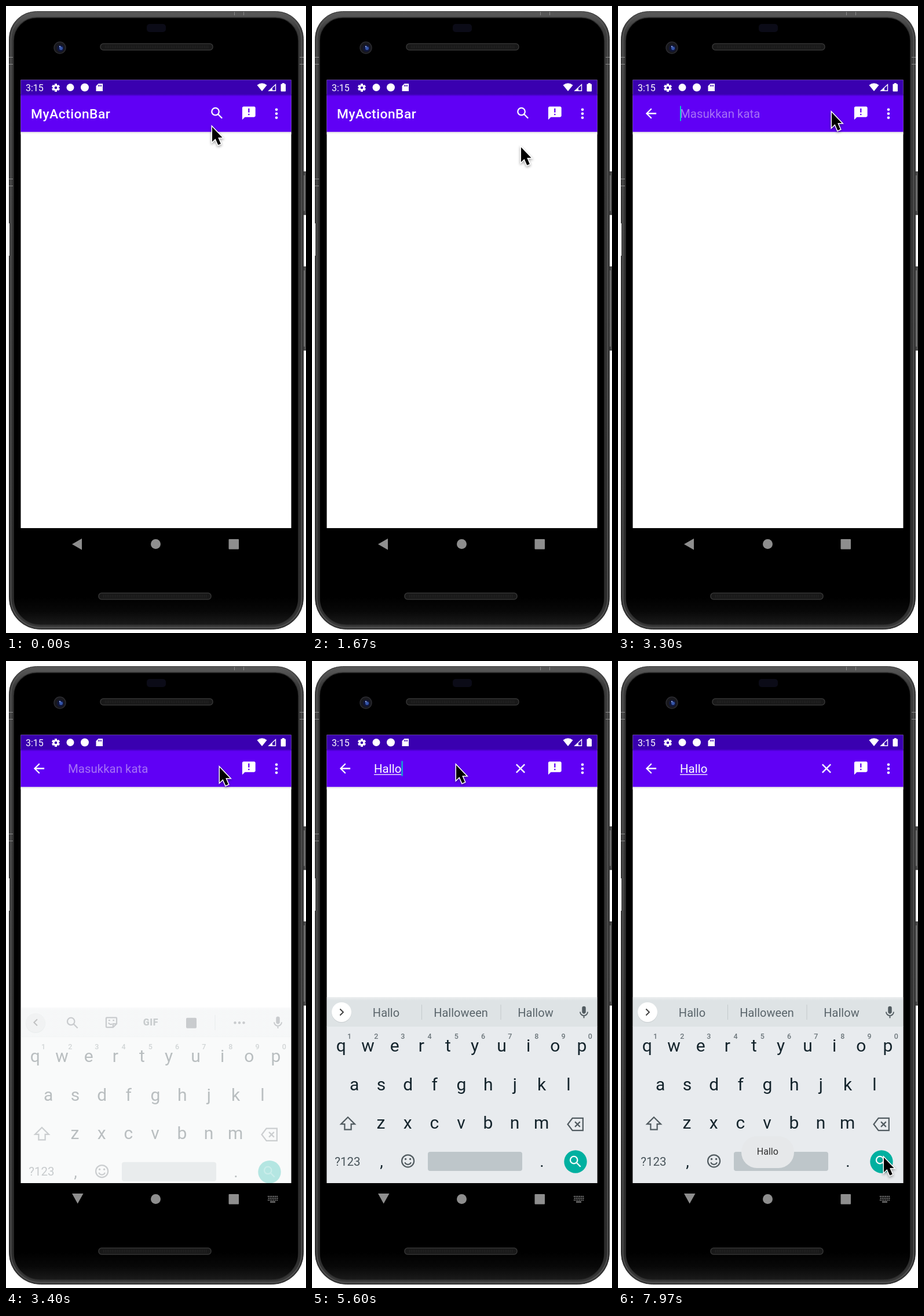
Recreate the animation shown at these times as an HTML page with a canvas. Size 518x1082 px, loop 8 s.

```html
<!DOCTYPE html>
<html lang="id">
<head>
<meta charset="utf-8">
<title>MyActionBar</title>
<style>
html, body { margin: 0; width: 518px; height: 1082px; overflow: hidden; background: #fff; }
canvas { display: block; }
</style>
</head>
<body>
<canvas id="stage" width="518" height="1082"></canvas>
<script>
const ctx = document.getElementById('stage').getContext('2d');
const LOOP = 8000;
const OPEN = 2850, KEYS_IN = 3340;
const TYPED = [4480, 4700, 4900, 5060, 5370];
const WORD = 'Hallo';
const FONT = 'Roboto, "Open Sans", sans-serif';
const GREY = '#525c61', INK = '#14242c';
const LEFT = 25.5, WIDE = 467;
const PITCH = 46.2;

// Pointer stops: time, x, y
const STOPS = [
  [0, 355, 206], [30, 355, 206], [770, 362, 297], [870, 362, 297],
  [1670, 360, 241], [1700, 360, 241], [2430, 368, 181], [3430, 368, 181],
  [3980, 248, 177], [6330, 248, 177], [7040, 469, 843], [7180, 469, 843],
  [7640, 458, 854], [8000, 458, 854]
];

const clamp = v => Math.max(0, Math.min(1, v));
const smooth = v => v * v * (3 - 2 * v);

function box(x, y, w, h, r, fill, line, lw = 1) {
  ctx.beginPath();
  ctx.roundRect(x, y, w, h, r);
  if (fill) { ctx.fillStyle = fill; ctx.fill(); }
  if (line) { ctx.strokeStyle = line; ctx.lineWidth = lw; ctx.stroke(); }
}

function disc(x, y, r, fill, line, lw = 1) {
  ctx.beginPath();
  ctx.arc(x, y, r, 0, 7);
  if (fill) { ctx.fillStyle = fill; ctx.fill(); }
  if (line) { ctx.strokeStyle = line; ctx.lineWidth = lw; ctx.stroke(); }
}

function label(str, x, y, size, fill, align = 'left', weight = 400, gap = 0) {
  ctx.font = `${weight} ${size}px ${FONT}`;
  ctx.letterSpacing = gap + 'px';
  ctx.textAlign = align;
  ctx.fillStyle = fill;
  ctx.fillText(str, x, y);
}

// Vertical gradient from [position, colour] pairs
function fade(y0, y1, ...stops) {
  const g = ctx.createLinearGradient(0, y0, 0, y1);
  for (const [at, colour] of stops) g.addColorStop(at, colour);
  return g;
}

// Icon path on a 24-unit grid, centred at x, y
function icon(d, x, y, scale, fill, lw) {
  const path = new Path2D(d);
  ctx.save();
  ctx.translate(x, y);
  ctx.scale(scale, scale);
  ctx.translate(-12, -12);
  if (lw) { ctx.strokeStyle = fill; ctx.lineWidth = lw; ctx.stroke(path); }
  else { ctx.fillStyle = fill; ctx.fill(path, 'evenodd'); }
  ctx.restore();
}

const ICON = {
  search: 'M15 9.5A5.5 5.5 0 1 1 4 9.5A5.5 5.5 0 1 1 15 9.5M13.6 13.6L19.7 19.7',
  note: 'M20 2H4C2.9 2 2 2.9 2 4V22L6 18H20C21.1 18 22 17.1 22 16V4C22 2.9 21.1 2 20 2ZM13 11H11V5H13ZM13 15H11V13H13Z',
  back: 'M20 12H5.5M12.7 4.7L5.4 12L12.7 19.3',
  close: 'M5.7 5.7L18.3 18.3M18.3 5.7L5.7 18.3',
  left: 'M14.8 6.7L9.5 12L14.8 17.3',
  right: 'M9.5 6.7L14.8 12L9.5 17.3',
  shift: 'M12 3L2.5 12.5H7.5V20H16.5V12.5H21.5Z',
  erase: 'M8 3.5H22.5V20.5H8L1.5 12ZM11.5 8.5L18.5 15.5M18.5 8.5L11.5 15.5',
  sticker: 'M5 4.5H19A1 1 0 0 1 20 5.5V14L14.5 19.5H5A1 1 0 0 1 4 18.5V5.5A1 1 0 0 1 5 4.5M20 14H14.5V19.5M7.5 12.5A4.2 4.2 0 0 0 13 14.5M7.5 8.8H10M14 8.8H16.5',
  mic: 'M12 14C13.7 14 15 12.7 15 11V5A3 3 0 0 0 9 5V11C9 12.7 10.3 14 12 14Z',
  stand: 'M6 11A6 6 0 0 0 18 11M12 17V21',
  smile: 'M21 12A9 9 0 1 1 3 12A9 9 0 1 1 21 12M7.5 14A4.8 4.8 0 0 0 16.5 14'
};

function buttons() {
  for (const [y, h] of [[286, 74], [450, 144]]) {
    box(512, y, 8, h, 2, '#4c4c4c', '#222');
    box(514, y + 6, 2, h - 12, 1, '#777');
  }
}

function speaker(x, y) {
  box(x, y, 194, 11, 5, '#191919', '#343434', 1.5);
  ctx.fillStyle = '#242424';
  for (let i = 8; i < 186; i += 3) ctx.fillRect(x + i, y + 3, 1, 5);
}

function phone() {
  ctx.fillStyle = '#fff';
  ctx.fillRect(0, 0, 518, 1082);
  buttons();
  const shell = fade(9, 1076, [0, '#5c5c5c'], [0.03, '#3c3c3c'], [0.95, '#2c2c2c'], [1, '#3a3a3a']);
  box(5.5, 9.5, 508, 1066, [47, 47, 54, 54], shell, '#2a2a2a');
  box(8.5, 12.5, 502, 1060, [45, 45, 51, 51], null, '#555', 1.5);
  ctx.fillStyle = '#8a8a8a';
  for (const x of [5, 507]) {
    ctx.fillRect(x, 88, 7, 1);
    ctx.fillRect(x, 100, 7, 1);
  }
  ctx.fillRect(394, 10, 1, 6);
  ctx.fillRect(410, 10, 1, 6);
  ctx.fillRect(5, 298, 7, 1);
  ctx.fillRect(5, 310, 7, 1);
  ctx.fillStyle = '#fff';
  ctx.fillRect(4, 375, 2, 56);
  const glass = fade(1020, 1070, [0, '#000'], [0.5, '#080808'], [1, '#1c1c1c']);
  box(13, 20, 492, 1048, [40, 40, 46, 46], glass, '#2d2d2d', 1.5);
  box(243, 31, 33, 14, 5, '#0b0b17');
  disc(93, 72, 10, '#18181d', '#2b2b30', 1.5);
  disc(94, 73, 6, '#10163a');
  disc(95, 73, 3, '#3454a8');
  disc(93, 70, 1.2, '#8fa4dd');
  speaker(163, 65);
  speaker(160, 1013);
}

function gear(x, y) {
  ctx.save();
  ctx.translate(x, y);
  ctx.fillStyle = '#fff';
  for (let i = 0; i < 6; i++) {
    ctx.rotate(Math.PI / 3);
    ctx.fillRect(-2, -7, 4, 4);
  }
  ctx.restore();
  disc(x, y, 3.8, null, '#fff', 3);
}

function statusBar() {
  ctx.fillStyle = '#3a00b0';
  ctx.fillRect(LEFT, 127.5, WIDE, 27);
  label('3:15', 34, 146.7, 16, '#fff');
  gear(86, 141);
  disc(111, 140.5, 6.5, '#fff');
  disc(136, 140.5, 7, '#fff');
  ctx.fillStyle = '#fff';
  ctx.fill(new Path2D('M159.5 134H167V147H155.5V138Z'));
  ctx.fillStyle = '#3a00b0';
  for (const x of [159, 161.4, 163.8]) ctx.fillRect(x, 136, 1.2, 3);
  ctx.fillStyle = '#fff';
  ctx.fill(new Path2D('M433.5 136.5Q442 130 450.5 136.5L442 147Z'));
  ctx.strokeStyle = '#fff';
  ctx.lineWidth = 1.4;
  ctx.stroke(new Path2D('M465.5 135.5V146.3H454Z'));
  ctx.fill(new Path2D('M460 141.5V146.3H455Z'));
  box(474.5, 134.5, 8.5, 13, 1, '#fff');
  ctx.fillRect(477, 133, 3.6, 2);
}

function caretOn(t) {
  const last = TYPED.filter(k => k <= t).pop() ?? OPEN + 50;
  return t >= last && (t - last) % 1000 < 500;
}

function appBar(t) {
  const count = TYPED.filter(k => k <= t).length;
  ctx.fillStyle = fade(152, 156, [0, '#3a00b0'], [1, '#6000f5']);
  ctx.fillRect(LEFT, 152, WIDE, 65.5);
  ctx.fillStyle = fade(217.5, 221, [0, '#e2e2e2'], [1, '#fff']);
  ctx.fillRect(LEFT, 217.5, WIDE, 4);

  if (t < OPEN) {
    label('MyActionBar', 43, 194.3, 22.75, '#fff', 'left', 500, 0.5);
    icon(ICON.search, 364.4, 185, 1.1375, '#fff', 2);
  } else {
    icon(ICON.back, 57, 185.5, 1.1375, '#fff', 2);
    let end = 107.5;
    if (count) {
      const text = WORD.slice(0, count);
      label(text, 107, 193, 20.475, '#fff');
      const w = ctx.measureText(text).width;
      ctx.fillRect(107, 195.3, w, 1.3);
      end = 107 + w + 0.7;
      icon(ICON.close, 360, 185.5, 1.1375, '#fff', 2);
    } else {
      label('Masukkan kata', 107, 193, 20.475, '#a672f5');
    }
    if (caretOn(t)) {
      ctx.fillStyle = '#03c8c8';
      ctx.fillRect(end - 0.5, 172.5, 2, 26);
    }
  }
  icon(ICON.note, 419.3, 184.8, 1.1375, '#fff');
  for (const y of [178.7, 185.7, 192.7]) disc(467, y, 2.3, '#fff');
}

function divider(x) {
  ctx.fillStyle = '#c3c9cc';
  ctx.fillRect(x, 593, 1, 26);
}

function toolStrip(t) {
  ctx.fillStyle = fade(579, 586, [0, '#eef0f1'], [1, '#dee3e5']);
  ctx.fillRect(LEFT, 580, WIDE, 51);
  disc(51, 607, 17.2, '#cdd2d4');
  disc(51, 606, 17, '#fff');
  if (t < TYPED[0]) {
    icon(ICON.left, 51, 606, 1.05, '#444', 1.9);
    icon(ICON.search, 115, 607, 1.13, GREY, 2);
    icon(ICON.sticker, 182, 606, 1.13, GREY, 2);
    label('GIF', 250, 611.5, 16, GREY, 'center', 900, 0.6);
    box(311, 598, 18, 18, 2, GREY);
    divider(360.5);
    for (const x of [395.5, 403, 410.5]) disc(x, 606.5, 2.2, GREY);
  } else {
    icon(ICON.right, 51, 606, 1.05, '#444', 1.9);
    divider(189);
    divider(325.5);
    if (t >= TYPED[2]) {
      label(WORD, 128, 614, 20, '#59646a', 'center');
      label('Halloween', 257, 614, 20, '#59646a', 'center');
      label('Hallow', 386, 614, 20, '#59646a', 'center');
    }
  }
  icon(ICON.mic, 469.5, 606.5, 1.08, GREY);
  icon(ICON.stand, 469.5, 606.5, 1.08, GREY, 1.8);
}

function keyRow(keys, x, y) {
  [...keys].forEach((k, i) => label(k, x + i * PITCH, y, 30, INK, 'center'));
}

function keyboard(t) {
  if (t < KEYS_IN) return;
  const p = clamp((t - KEYS_IN) / 220);
  ctx.save();
  ctx.beginPath();
  ctx.rect(LEFT, 217, WIDE, 684);
  ctx.clip();
  ctx.globalAlpha = p;
  ctx.translate(0, 34 * (1 - p) ** 2);
  ctx.fillStyle = '#e8ebee';
  ctx.fillRect(LEFT, 630, WIDE, 271);
  toolStrip(t);
  keyRow('qwertyuiop', 50.2, 674);
  [...'1234567890'].forEach((k, i) =>
    label(k, 64.5 + i * PITCH, 652, 12.5, '#6b757a', 'center', 500));
  keyRow('asdfghjkl', 73.2, 741);
  keyRow('zxcvbnm', 119, 807);
  icon(ICON.shift, 62, 798.5, 1.25, GREY, 1.8);
  icon(ICON.erase, 454.7, 799.5, 1.25, GREY, 1.8);
  label('?123', 61.5, 870.5, 20.5, '#48545a', 'center');
  label(',', 120, 873, 28, INK, 'center');
  label('.', 397, 873, 28, INK, 'center');
  icon(ICON.smile, 165.6, 862.8, 1.17, GREY, 1.9);
  disc(161.6, 859.5, 1.7, GREY);
  disc(169.6, 859.5, 1.7, GREY);
  box(200, 847, 163, 33, 4, '#bec6ca');
  disc(455, 864, 19.7, '#00b0a0');
  icon(ICON.search, 455, 864, 1.13, '#fff', 2);
  ctx.restore();
}

function navBar(t) {
  const grey = '#8e8e8e', typing = t >= KEYS_IN;
  ctx.fillStyle = grey;
  ctx.fill(new Path2D(typing ? 'M114 919H133.5L123.7 936.5Z' : 'M131 919V938.5L114 928.7Z'));
  disc(258.5, 928.5, 8.5, grey);
  box(384.5, 920, 17.5, 17.5, 1, grey);
  if (!typing) return;
  ctx.fillStyle = '#858585';
  for (let r = 0; r < 3; r++)
    for (let c = 0; c < 6; c++) ctx.fillRect(452 + c * 3 + (r === 1 ? 0.6 : 0), 923 + r * 3.2, 1.9, 1.9);
  ctx.fillRect(456, 932.5, 9, 2);
}

function toast(t) {
  const a = clamp((t - 7850) / 110);
  if (!a) return;
  ctx.save();
  ctx.globalAlpha = a;
  box(213, 820, 91, 55, 27, '#e6e8ea');
  label(WORD, 258.3, 852, 16, '#303030', 'center');
  ctx.restore();
}

function pointer(t) {
  const i = STOPS.findIndex(s => s[0] > t);
  const a = STOPS[i - 1], b = STOPS[i];
  const p = smooth((t - a[0]) / (b[0] - a[0]));
  ctx.save();
  ctx.translate(a[1] + (b[1] - a[1]) * p, a[2] + (b[2] - a[2]) * p + 0.7);
  const arrow = new Path2D('M1 2V27.5L6.6 22.2L11.3 33L15.8 31.1L11.2 20.3H18.5Z');
  ctx.shadowColor = 'rgba(0,0,0,.4)';
  ctx.shadowBlur = 4;
  ctx.shadowOffsetY = 2;
  ctx.strokeStyle = '#fff';
  ctx.lineWidth = 3;
  ctx.stroke(arrow);
  ctx.shadowColor = 'transparent';
  ctx.fillStyle = '#000';
  ctx.fill(arrow);
  ctx.restore();
}

function draw() {
  const t = performance.now() % LOOP;
  phone();
  ctx.fillStyle = '#fff';
  ctx.fillRect(LEFT, 127.5, WIDE, 773.5);
  statusBar();
  appBar(t);
  keyboard(t);
  navBar(t);
  toast(t);
  pointer(t);
  requestAnimationFrame(draw);
}
draw();
</script>
</body>
</html>
```
